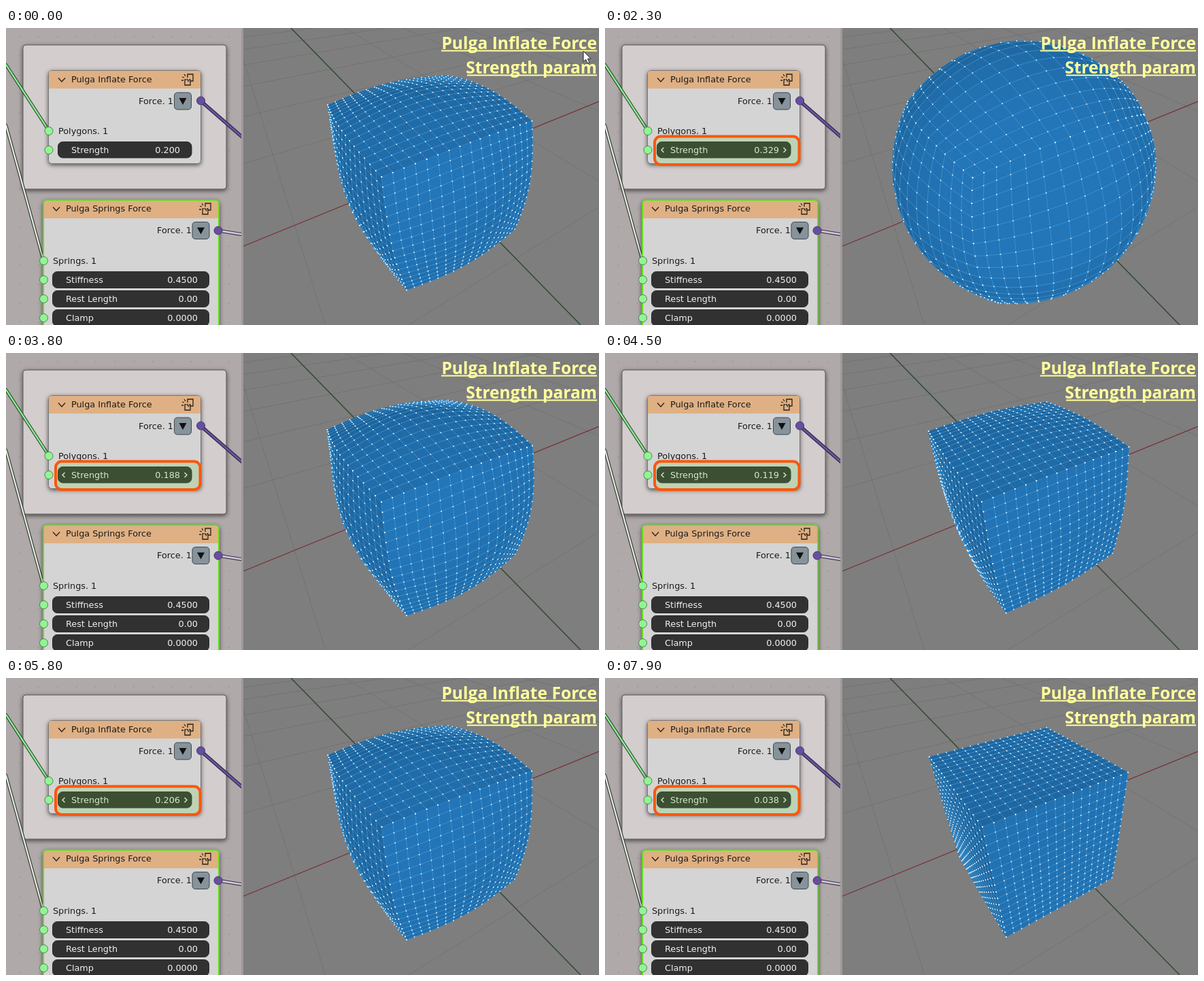
These frames come from a looping animation (872 px wide and 437 px high, 8000 ms). An HTML page with a canvas:

```html
<!DOCTYPE html>
<html lang="en">
<head>
<meta charset="utf-8">
<title>Pulga Inflate Force</title>
<style>
  html, body { margin: 0; width: 100%; height: 100%; overflow: hidden; background: #7e7e7e; }
  #stage { position: relative; width: 872px; height: 437px; overflow: hidden; }
  canvas, svg { position: absolute; left: 0; top: 0; }
  text { font: 12.8px "DejaVu Sans", sans-serif; fill: #1a1a1a; }
  .light text, text.light { fill: #f0f0f0; }
  .end { text-anchor: end; }
  .title text { font: bold 24.6px "Open Sans", "Noto Sans", sans-serif; fill: #ffff9c; text-anchor: end; }
  .field { fill: #323131; stroke: #2a2a2a; }
  .wire { fill: none; stroke-linecap: round; }
</style>
</head>
<body>
<div id="stage">
  <canvas id="view" width="872" height="437"></canvas>
  <svg width="872" height="437" viewBox="0 0 872 437">
    <defs>
      <pattern id="dots" width="28" height="28" patternUnits="userSpaceOnUse">
        <circle cx="20" cy="13" r="1" fill="#9d9797"/>
      </pattern>
      <filter id="shadow" x="-10%" y="-10%" width="120%" height="125%">
        <feDropShadow dx="0" dy="2" stdDeviation="3" flood-color="#000" flood-opacity=".6"/>
      </filter>
      <clipPath id="left"><rect width="347" height="437"/></clipPath>
      <g id="pop" fill="none" stroke="#2a211a" stroke-width="1.3">
        <path d="M0 -3V-8H8V2H4M-2 0H-4V8H4V0H2"/>
        <path d="M-8 -4L-5 -3M-5 -8L-3 -5M-9 1H-6M-1 -1L2 3"/>
      </g>
      <g id="menu">
        <rect x="-12.5" y="-12.5" width="25" height="25" rx="4.5" fill="#87939a" stroke="#3e474c"/>
        <path d="M-5.5 -4.5H5.5L0 5.5Z" fill="#111"/>
      </g>
      <circle id="in" r="6" fill="#92f594" stroke="#4c8450"/>
      <circle id="out" r="6" fill="#674f9f" stroke="#44366e"/>
      <path id="fold" d="M-5 -2.5L0 3L5 -2.5" fill="none" stroke="#2a211a" stroke-width="1.3"/>
    </defs>

    <g clip-path="url(#left)">
      <rect width="347" height="437" fill="#afa9a9"/>
      <rect width="347" height="437" fill="url(#dots)"/>
      <rect x="25" y="25" width="299" height="212" rx="4" fill="#d3cdce" stroke="#5a5656" filter="url(#shadow)"/>

      <g class="wire">
        <path d="M0 54L63 151" stroke="#24402a" stroke-width="4.5"/>
        <path d="M0 54L63 151" stroke="#8de990" stroke-width="2.4"/>
        <path d="M0 143L55 342" stroke="#2a302a" stroke-width="4.5"/>
        <path d="M0 143L55 342" stroke="#dfe9dc" stroke-width="2.4"/>
        <path d="M286 107L348 161" stroke="#2d2445" stroke-width="5"/>
        <path d="M286 107L348 161" stroke="#6c549f" stroke-width="2.8"/>
        <path d="M312 298L349 304" stroke="#373045" stroke-width="5"/>
        <path d="M312 298L349 304" stroke="#cdc5da" stroke-width="2.8"/>
      </g>

      <g filter="url(#shadow)">
        <rect x="62.5" y="62.5" width="224" height="137" rx="5" fill="#d4d4d4" stroke="#777"/>
      </g>
      <path d="M63 89V67q0-4 4-4H282q4 0 4 4V89Z" fill="#dfb083"/>
      <use href="#fold" x="82" y="76"/>
      <text x="96" y="80">Pulga Inflate Force</text>
      <use href="#pop" x="267" y="76"/>
      <text class="end" x="246" y="112">Force. 1</text>
      <use href="#menu" x="260" y="107.5"/>
      <use href="#out" x="286.5" y="107"/>
      <text x="77" y="156">Polygons. 1</text>
      <rect class="field" x="76.5" y="167.5" width="196.5" height="23.5" rx="7"/>
      <g class="light">
        <text x="96" y="184">Strength</text>
        <text id="value" class="end" x="256" y="184">0.200</text>
      </g>
      <path id="arrows" d="M86.5 176L83 179.5L86.5 183M262.5 176L266 179.5L262.5 183" fill="none" stroke="#f0f0f0" stroke-width="1.4"/>
      <rect id="mark" x="73" y="159.5" width="212.5" height="41.5" rx="9" fill="rgba(100,200,60,.2)" stroke="#fa570b" stroke-width="4"/>
      <use href="#in" x="63" y="151.5"/>
      <use href="#in" x="63" y="179.5"/>

      <g filter="url(#shadow)">
        <rect x="55" y="253.5" width="258" height="210" rx="5" fill="#d4d4d4" stroke="#62dc1f" stroke-width="2"/>
      </g>
      <path d="M56 280V258q0-3.5 4-3.5H308q4 0 4 3.5V280Z" fill="#dfb083"/>
      <use href="#fold" x="74" y="266"/>
      <text x="88" y="270">Pulga Springs Force</text>
      <use href="#pop" x="293" y="266"/>
      <text class="end" x="273" y="302">Force. 1</text>
      <use href="#menu" x="286.5" y="298"/>
      <use href="#out" x="312" y="298"/>
      <text x="69" y="347">Springs. 1</text>
      <use href="#in" x="55.5" y="342.5"/>
      <g id="rows" class="light"></g>
    </g>
    <rect x="346" width="3" height="437" fill="#a09a9a"/>

    <g class="title">
      <text x="869" y="31">Pulga Inflate Force</text>
      <text x="869" y="67">Strength param</text>
      <path d="M640 33.5H869M678 69.5H869" stroke="#ffff9c" stroke-width="2"/>
    </g>
    <path id="cursor" d="M0 0V15.500L3.600 12.200L6.100 18L8.800 16.900L6.300 11.200H11Z" fill="#fff" stroke="#222"/>
  </svg>
</div>
<script>
const $ = id => document.getElementById(id);
const ctx = $('view').getContext('2d');
const LOOP = 8000, STEP = 100, CELLS = 16;

// ms, roundness, ball radius, strength
const KEYS = [
  [0, .32, 1.865, .2], [1500, .32, 1.865, .2], [2300, .9, 1.975, .329], [2400, .93, 2, .338],
  [2700, 1, 2.27, .362], [3100, .93, 1.99, .296], [3300, .63, 1.91, .254], [3700, .4, 1.87, .2],
  [4200, .26, 1.84, .138], [4500, .18, 1.81, .119], [5000, .18, 1.81, .135],
  [5800, .3, 1.865, .206], [6050, .42, 1.87, .228], [6700, .83, 1.95, .272],
  [7000, .63, 1.91, .224], [7300, .28, 1.85, .15], [7700, .06, 1.81, .062], [7900, .02, 1.81, .038]
];

function sample(ms) {
  let i = 1;
  while (i < KEYS.length - 1 && ms > KEYS[i][0]) i++;
  const a = KEYS[i - 1], b = KEYS[i];
  const k = Math.min(1, (ms - a[0]) / (b[0] - a[0]));
  return a.map((v, j) => v + (b[j] - v) * k);
}

// Perspective from the nearest cube corner and the ends of its three edges
const NEAR = [555, 219];
const ENDS = [[769, 139], [477, 116], [590, 381]];
const DEPTH = [.28, .435, .42];
function project(p) {
  let x = NEAR[0], y = NEAR[1], w = 1;
  for (let i = 0; i < 3; i++) {
    const t = (p[i] + 1) / 2, d = 1 + DEPTH[i];
    x += t * (ENDS[i][0] * d - NEAR[0]);
    y += t * (ENDS[i][1] * d - NEAR[1]);
    w += t * DEPTH[i];
  }
  return [x / w, y / w];
}

function line(p, q, color, width) {
  ctx.strokeStyle = color;
  ctx.lineWidth = width;
  ctx.beginPath();
  ctx.moveTo(...p);
  ctx.lineTo(...q);
  ctx.stroke();
}

function drawFloor() {
  ctx.fillStyle = '#7e7e7e';
  ctx.fillRect(0, 0, 872, 437);
  const start = (k, own, other) => (-1.42 - own * k / 2) / other * 2;
  const grid = (a, b) => line(project(a), project(b), '#737373', 1);
  for (let k = -24; k <= 24; k += 2) {
    if (!k) continue;
    grid([k, start(k, DEPTH[0], DEPTH[1]), 0], [k, 60, 0]);
    grid([start(k, DEPTH[1], DEPTH[0]), k, 0], [60, k, 0]);
  }
  line([349, 321], [872, 108], '#762f33', 1.3);
  line([419, 0], [845, 437], '#2f4b30', 1.5);
}

const sub = (a, b) => a.map((v, i) => v - b[i]);
const cross = (a, b) => [0, 1, 2].map(i => {
  const j = (i + 1) % 3, k = (i + 2) % 3;
  return a[j] * b[k] - a[k] * b[j];
});

function shade(n) {
  const len = Math.hypot(...n) || 1;
  const s = .72 - (.12 * n[0] + .28 * n[1] + .18 * n[2]) / len;
  return `rgb(${[34, 113, 177].map(c => Math.round(c * Math.max(.7, Math.min(1.04, s))))})`;
}

function drawFace(axis, side, round, radius) {
  const pts = [], scr = [];
  for (let i = 0; i <= CELLS; i++) for (let j = 0; j <= CELLS; j++) {
    const c = [0, 0, 0];
    c[axis] = side;
    c[(axis + 1) % 3] = 2 * i / CELLS - 1;
    c[(axis + 2) % 3] = 2 * j / CELLS - 1;
    const grow = 1 - round + round * radius / Math.hypot(...c);
    const p = c.map(v => v * grow);
    pts.push(p);
    scr.push(project(p));
  }
  const edges = new Path2D(), seen = new Set();
  for (let i = 0; i < CELLS; i++) for (let j = 0; j < CELLS; j++) {
    const o = i * (CELLS + 1) + j;
    const quad = [o, o + CELLS + 1, o + CELLS + 2, o + 1];
    const [a, b, c, d] = quad.map(k => scr[k]);
    const area = (c[0] - a[0]) * (d[1] - b[1]) - (c[1] - a[1]) * (d[0] - b[0]);
    if (area * side <= 0) continue;
    const [p, q, r, s] = quad.map(k => pts[k]);
    const cell = new Path2D();
    cell.moveTo(...a);
    for (const v of [b, c, d]) cell.lineTo(...v);
    cell.closePath();
    ctx.fillStyle = ctx.strokeStyle = shade(cross(sub(r, p), sub(s, q)).map(v => v * side));
    ctx.lineWidth = .6;
    ctx.fill(cell);
    ctx.stroke(cell);
    edges.addPath(cell);
    quad.forEach(k => seen.add(k));
  }
  ctx.strokeStyle = 'rgba(66,165,232,.55)';
  ctx.lineWidth = .6;
  ctx.stroke(edges);
  return [...seen].map(k => scr[k]);
}

function drawMesh(round, radius) {
  const dots = [];
  for (let axis = 0; axis < 3; axis++)
    for (const side of [1, -1]) dots.push(...drawFace(axis, side, round, radius));
  ctx.fillStyle = '#f4faff';
  for (const [x, y] of dots) ctx.fillRect(x - .8, y - .8, 1.6, 1.6);
}

const show = (id, on) => $(id).style.display = on ? '' : 'none';

function draw(ms) {
  const [, round, radius, strength] = sample(ms);
  drawFloor();
  drawMesh(round, radius);
  $('value').textContent = strength.toFixed(3);
  show('mark', ms >= 500);
  show('arrows', ms >= 1100);
  show('cursor', ms < 1100);
  const k = Math.min(1, ms / 900), e = k * k * (3 - 2 * k);
  $('cursor').setAttribute('transform', `translate(${849 - 669 * e} ${34 + 136 * e})`);
}

$('rows').innerHTML = [['Stiffness', '0.4500'], ['Rest Length', '0.00'], ['Clamp', '0.0000']]
  .map(([name, num], i) => {
    const y = 370.5 + 28 * i;
    return `<rect class="field" x="68.5" y="${y - 12}" width="230" height="24" rx="7"/>
      <text x="88" y="${y + 4.5}">${name}</text><text class="end" x="282" y="${y + 4.5}">${num}</text>
      <use href="#in" x="55.5" y="${y}"/>`;
  }).join('');

let last = -1;
const begin = performance.now();
function tick() {
  const ms = Math.floor((performance.now() - begin) % LOOP / STEP) * STEP;
  if (ms !== last) draw(last = ms);
  requestAnimationFrame(tick);
}
tick();
</script>
</body>
</html>
```
